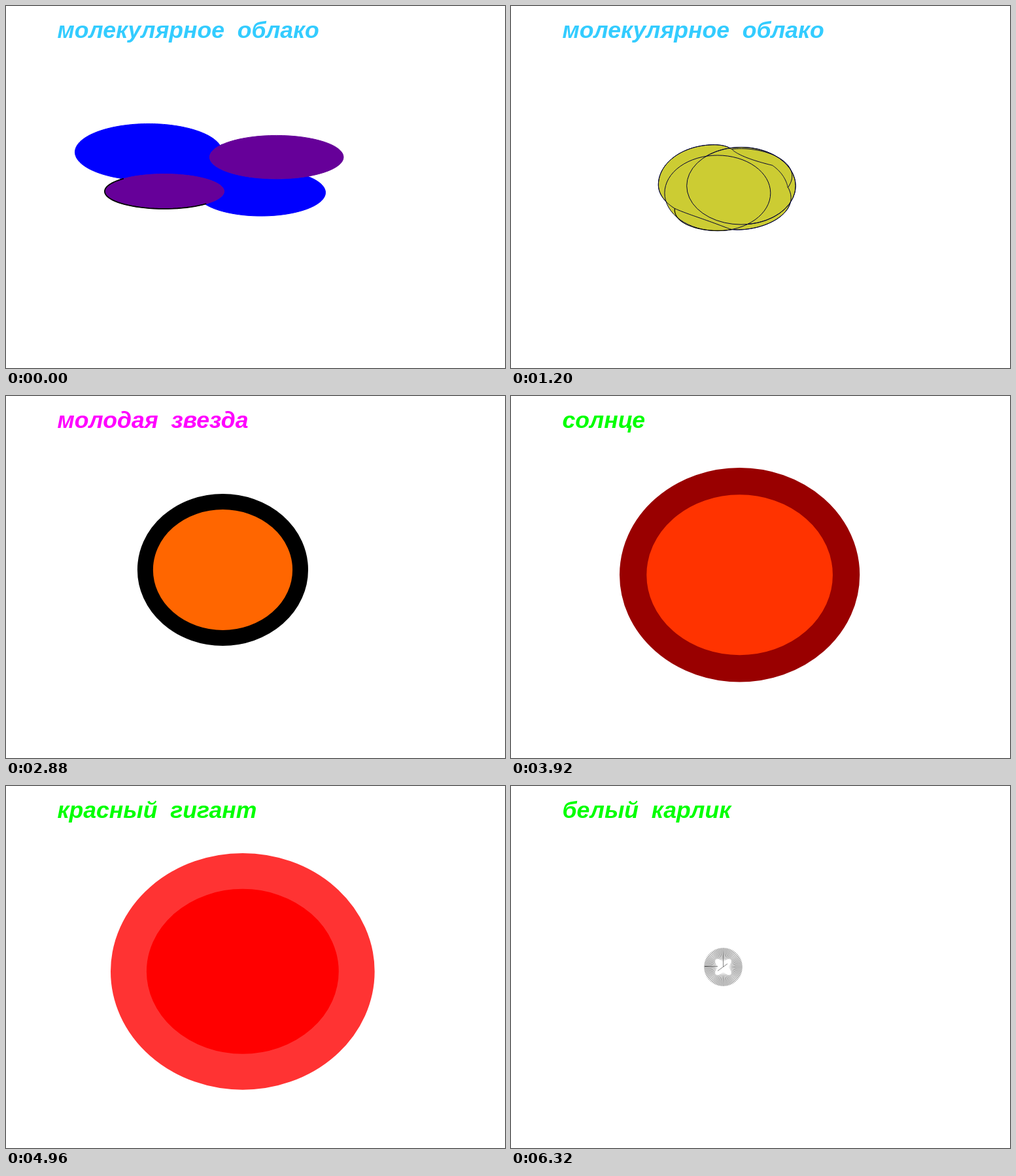
Animation, 763 px wide and 555 px high, one loop 6880 ms. Source, as an HTML page:

```html
<!DOCTYPE html>
<html lang="ru">
<head>
<meta charset="utf-8">
<title>Эволюция звезды</title>
<style>
html, body { margin: 0; width: 100%; height: 100%; overflow: hidden; background: #fff; }
svg { display: block; }
text { font: italic bold 35.6px "Liberation Sans", Arial, sans-serif; white-space: pre; }
</style>
</head>
<body>
<svg width="763" height="555" viewBox="0 0 763 555">
  <radialGradient id="glow" gradientUnits="userSpaceOnUse" cx="324.5" cy="277.5" r="29.5">
    <stop offset="0.25" stop-color="#fff"></stop>
    <stop offset="0.6" stop-color="#999"></stop>
    <stop offset="1" stop-color="#666"></stop>
  </radialGradient>
  <text id="label" x="78.5" y="49"></text>
  <g id="cloud" stroke-linejoin="round"></g>
  <ellipse id="star"></ellipse>
  <g id="dwarf" fill="none">
    <path id="rays" stroke="url(#glow)" stroke-width="1"></path>
    <path d="M324.5 277.5V249M316 283.5L331 272.5M296 276.5H316" stroke="#777" stroke-width="0.9"></path>
  </g>
</svg>
<script>
const STEP = 80, STEPS = 86;
const BLUE = [0, 0, 255], PURPLE = [102, 0, 153], YELLOW = [255, 255, 0], BLACK = [0, 0, 0];

// ellipses: cx, cy, rx, ry
const LEFT = [218, 224, 112.5, 43.5], UPPER = [413.7, 231.7, 102.3, 33.3];
const RIGHT = [390, 286, 98.5, 36], LOWER = [242.2, 284.2, 91.3, 26.7];
const CORE = [335.5, 287.5, 78.2, 66.2];

// chains of arcs: ellipse, its angles, matching angles on the core
const TOP = [[LEFT, 110, 180, 148, 180], [LEFT, 180, 270, 180, 270], [LEFT, 270, 347, 270, 273]];
const UPPER_IN = [[UPPER, 216, 75, 273, 313], [UPPER, 75, 63, 313, 356]];
const UPPER_OUT = [[UPPER, 216, 423, 273, 356]];
const BOTTOM = [[RIGHT, -43, 151, -4, 82]];
const LOWER_IN = [[LOWER, 45.5, -133, 82, 148]];
const LOWER_OUT = [[LOWER, 45.5, 227, 82, 148]];
const UPPER_FULL = [[UPPER, 0, 360, 0, 360]];

// outer box (left, right, top, bottom), line width, fill, line colour
const STAGES = [
  { at: 19, box: [257, 414, 221, 354], w: 1, fill: YELLOW, line: BLACK },
  { at: 39, box: [191, 470.5, 137.5, 388], w: 28, fill: [255, 102, 0], line: [1, 0, 0] },
  { at: 59, box: [141, 596, 82.5, 489], w: 54.6, fill: [255, 0, 0], line: [254.8, 0, 0] },
  { at: 79, box: [267.7, 380.4, 219, 333.4], w: 56.6, fill: [153, 153, 153], line: [255, 255, 255] }
];
const LABELS = [
  [0, "молекулярное  облако", "#33ccff"],
  [19, "молодая  звезда", "#ff00ff"],
  [39, "солнце", "#00ff00"],
  [59, "красный  гигант", "#00ff00"],
  [79, "белый  карлик", "#00ff00"]
];

const $ = id => document.getElementById(id);
const mix = (a, b, p) => a + (b - a) * p;
const mixAll = (a, b, p) => a.map((v, i) => mix(v, b[i], p));
// colours fall on the web-safe palette
const tint = (a, b, p) => `rgb(${mixAll(a, b, p).map(v => Math.round(v / 51) * 51)})`;
const set = (el, attrs) => { for (const k in attrs) el.setAttribute(k, attrs[k]); };

function add(tag) {
  const el = document.createElementNS("http://www.w3.org/2000/svg", tag);
  $("cloud").append(el);
  return el;
}
const body = add("path"), upper = add("ellipse"), lower = add("ellipse");
const seams = add("path"), rim = add("path");

function onEllipse([cx, cy, rx, ry], deg) {
  const a = deg * Math.PI / 180;
  return [cx + rx * Math.cos(a), cy + ry * Math.sin(a)];
}

function arc([shape, a0, a1, c0, c1], p) {
  const pts = [];
  for (let i = 0; i <= 40; i++) {
    const u = i / 40;
    const q = mixAll(onEllipse(shape, mix(a0, a1, u)), onEllipse(CORE, mix(c0, c1, u)), p);
    pts.push(q.map(v => v.toFixed(2)).join(" "));
  }
  return pts.join("L");
}
const trace = (arcs, p) => "M" + arcs.map(a => arc(a, p)).join("L");

function oval(el, [cx, cy, rx, ry], attrs) {
  set(el, { cx, cy, rx, ry, ...attrs });
}

function drawCloud(p) {
  const outline = trace([...TOP, ...UPPER_IN, ...BOTTOM, ...LOWER_IN], p) + "Z";
  const blueLine = tint(BLUE, BLACK, p);
  const purple = { fill: tint(PURPLE, YELLOW, p), stroke: tint(PURPLE, BLACK, p) };
  set(body, { d: outline, fill: tint(BLUE, YELLOW, p), stroke: blueLine });
  oval(upper, mixAll(UPPER, CORE, p), purple);
  oval(lower, mixAll(LOWER, CORE, p), purple);
  // inner lines show through once the colours part
  set(seams, {
    d: outline + trace(UPPER_OUT, p) + trace(UPPER_FULL, p), fill: "none",
    stroke: blueLine, visibility: p > 0 ? "inherit" : "hidden"
  });
  set(rim, { d: trace(LOWER_OUT, p), fill: "none", stroke: "#000", "stroke-width": mix(1.8, 1, p) });
}

function drawStar(n) {
  const i = STAGES.findLastIndex(s => n >= s.at);
  const a = STAGES[i], b = STAGES[i + 1];
  const p = (n - a.at) / (b.at - a.at);
  const [l, r, t, bot] = mixAll(a.box, b.box, p), w = mix(a.w, b.w, p);
  oval($("star"), [(l + r) / 2, (t + bot) / 2, (r - l - w) / 2, (bot - t - w) / 2], {
    fill: tint(a.fill, b.fill, p), stroke: tint(a.line, b.line, p), "stroke-width": w
  });
}

function rays(count) {
  let d = "";
  for (let i = 0; i < count; i++) {
    const deg = i * 360 / count;
    const ray = r => onEllipse([324.5, 277.5, r, r], deg).map(v => v.toFixed(2)).join(" ");
    const inner = 12 - 4 * Math.cos(4 * deg * Math.PI / 180);
    d += `M${ray(inner)}L${ray(29.3)}`;
  }
  return d;
}
set($("rays"), { d: rays(80) });

const show = (id, on) => set($(id), { visibility: on ? "visible" : "hidden" });

let last = -1;
function draw(time) {
  const n = Math.floor(time / STEP) % STEPS;
  if (n !== last) {
    last = n;
    const [, text, fill] = LABELS.findLast(l => n >= l[0]);
    $("label").textContent = text;
    set($("label"), { fill });
    show("cloud", n < 19);
    show("star", n >= 19 && n < 79);
    show("dwarf", n >= 79);
    if (n < 19) drawCloud(n / 19);
    else if (n < 79) drawStar(n);
  }
  requestAnimationFrame(() => draw(performance.now()));
}
draw(0);
</script>
</body>
</html>
```
